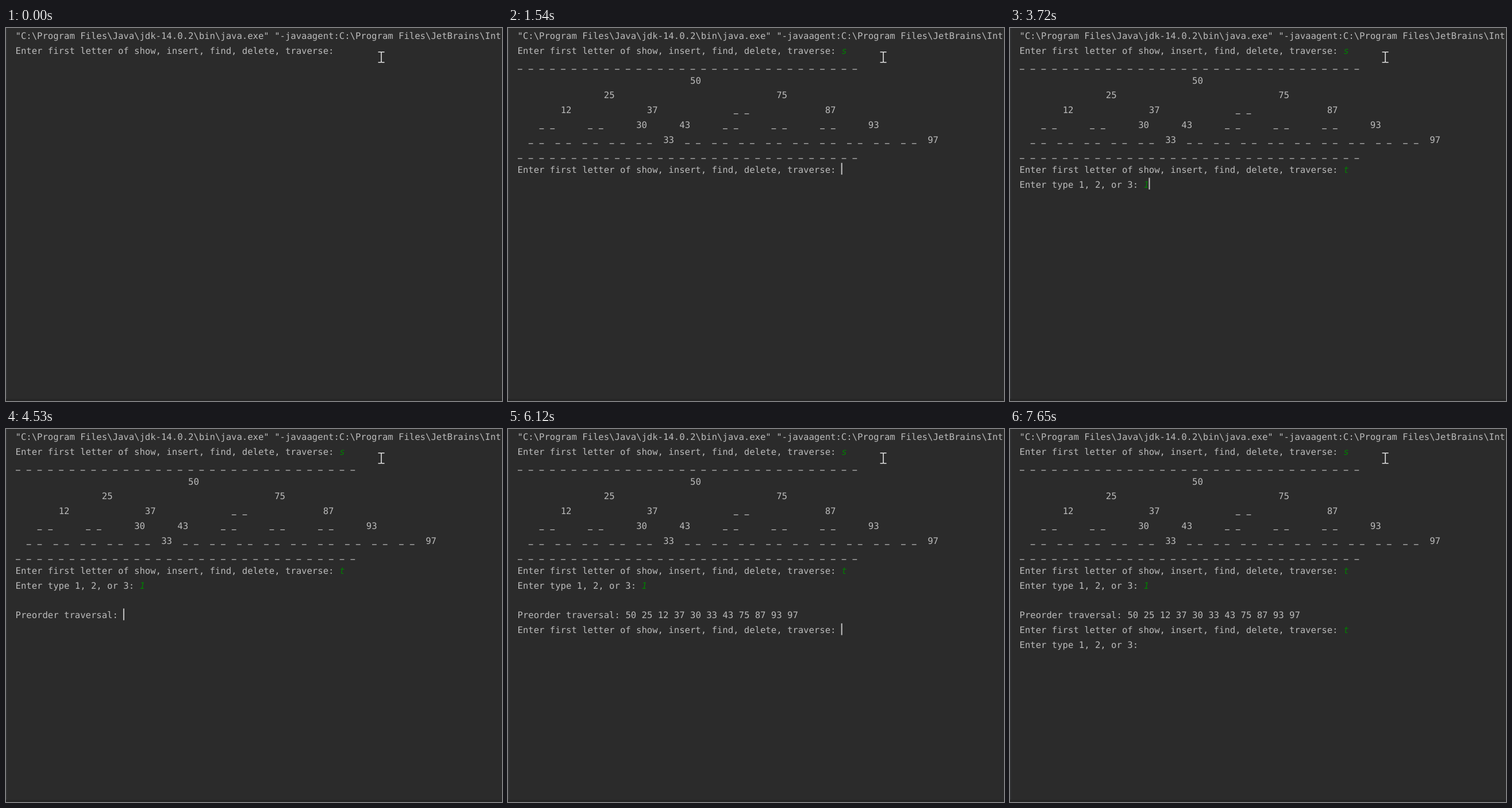
Animation of 863x649 px, one loop 8 s. Source, as an HTML page:

```html
<!DOCTYPE html>
<html lang="en">
<head>
<meta charset="utf-8">
<title>Binary tree console</title>
<style>
  html, body { margin: 0; width: 100%; height: 100%; overflow: hidden; background: #2b2b2b; }
  svg { display: block; width: 863px; height: 649px; }
  text {
    font: 15.604px "DejaVu Sans Mono", "Noto Sans Mono", monospace;
    fill: #bbb;
    white-space: pre;
    text-rendering: geometricPrecision;
  }
  .typed { fill: #007f00; font-style: italic; }
  .dashes { stroke: #bbb; stroke-width: 1.25; }
  .caret { fill: #c4c4c4; }
  .pointer { fill: none; stroke: #e2e2e2; stroke-width: 1.6; }
</style>
</head>
<body>
<svg viewBox="0 0 863 649">
  <rect width="863" height="649" fill="#2b2b2b"/>
  <rect width="2" height="649" fill="#323334"/>
  <rect y="645" width="863" height="4" fill="#262626"/>
  <g id="screen"></g>
  <path class="pointer" d="M647.5 41.7H652L653 42.7L654 41.7H658.5M653 42V60M647.5 59.7H652L653 58.7L654 59.7H658.5"/>
</svg>
<script>
const LOOP = 8000;
const LEFT = 16, CELL = 9.394, ROW = 25.87;
const TEXT_SHIFT = 0.5, BASELINE = 18.9;
const CARET_TOP = 1.88, CARET_HEIGHT = 20.4;

const command = String.raw`"C:\Program Files\Java\jdk-14.0.2\bin\java.exe" "-javaagent:C:\Program Files\JetBrains\Int`;
const prompt = 'Enter first letter of show, insert, find, delete, traverse: ';
const askType = 'Enter type 1, 2, or 3: ';
const values = [50, 25, 12, 37, 30, 33, 43, 75, 87, 93, 97];

// Binary search tree stored in heap order, root at 1.
const heap = [];
for (const value of values) {
  let node = 1;
  while (heap[node]) node = 2 * node + (value > heap[node] ? 1 : 0);
  heap[node] = value;
}

function treeLevel(depth) {
  const count = 2 ** depth;
  const nodes = Array.from({ length: count }, (_, i) => heap[count + i] ?? '_ _');
  return ' '.repeat(32 / count) + nodes.join(' '.repeat(64 / count - 2));
}

const rule = '_ '.repeat(32);
const tree = [rule, ...[0, 1, 2, 3, 4].map(treeLevel), rule].join('\n') + '\n';

// [time, appended output, caret visible]
const events = [
  [0, command + '\n' + prompt, false],
  [70, '', true],
  [140, 's', true],
  [340, '\n', true],
  [540, tree + prompt, true],
  [1080, '', false],
  [1540, '', true],
  [2070, 't', true],
  [2400, '\n', true],
  [2600, askType, true],
  [3590, '', false],
  [3720, '1', true],
  [4530, '\n\nPreorder traversal: ', true],
  [4730, values.join(' ') + '\n' + prompt, true],
  [5590, '', false],
  [6120, '', true],
  [6520, 't', true],
  [6720, '\n', true],
  [6920, askType, true],
  [7650, '', false]
];

function add(parent, name, attributes) {
  const element = document.createElementNS('http://www.w3.org/2000/svg', name);
  for (const key in attributes) element.setAttribute(key, attributes[key]);
  return parent.appendChild(element);
}

const columnX = column => LEFT + column * CELL;

function addLine(parent, line, column, row, typed) {
  const y = BASELINE + row * ROW;
  const label = line.replace(/_/g, ' ');
  if (label.trim()) {
    const indent = label.search(/\S/);
    const x = columnX(column + indent) + TEXT_SHIFT;
    const text = add(parent, 'text', { x, y, class: typed ? 'typed' : 'output' });
    text.textContent = label.slice(indent).trimEnd();
  }
  const dashes = [...line.matchAll(/_/g)]
    .map(match => `M${columnX(column + match.index) + 1} ${y + 1.2}h7.8`);
  if (dashes.length) add(parent, 'path', { class: 'dashes', d: dashes.join('') });
}

const screen = document.getElementById('screen');
let row = 0, column = 0;

const steps = events.map(([time, output, caretOn]) => {
  const group = add(screen, 'g', {});
  const typed = /^\w$/.test(output);
  output.split('\n').forEach((line, i) => {
    if (i) { row++; column = 0; }
    addLine(group, line, column, row, typed);
    column += line.length;
  });
  const caret = caretOn && add(screen, 'rect', {
    class: 'caret', x: columnX(column), y: CARET_TOP + row * ROW, width: 2, height: CARET_HEIGHT
  });
  return { time, group, caret };
});

const show = (element, visible) => element.setAttribute('visibility', visible ? 'visible' : 'hidden');

function render(time) {
  steps.forEach((step, i) => {
    const started = time >= step.time;
    const ended = time >= (steps[i + 1]?.time ?? LOOP);
    show(step.group, started);
    if (step.caret) show(step.caret, started && !ended);
  });
}

const start = performance.now();
function tick() {
  render((performance.now() - start) % LOOP);
  requestAnimationFrame(tick);
}
tick();
</script>
</body>
</html>
```
